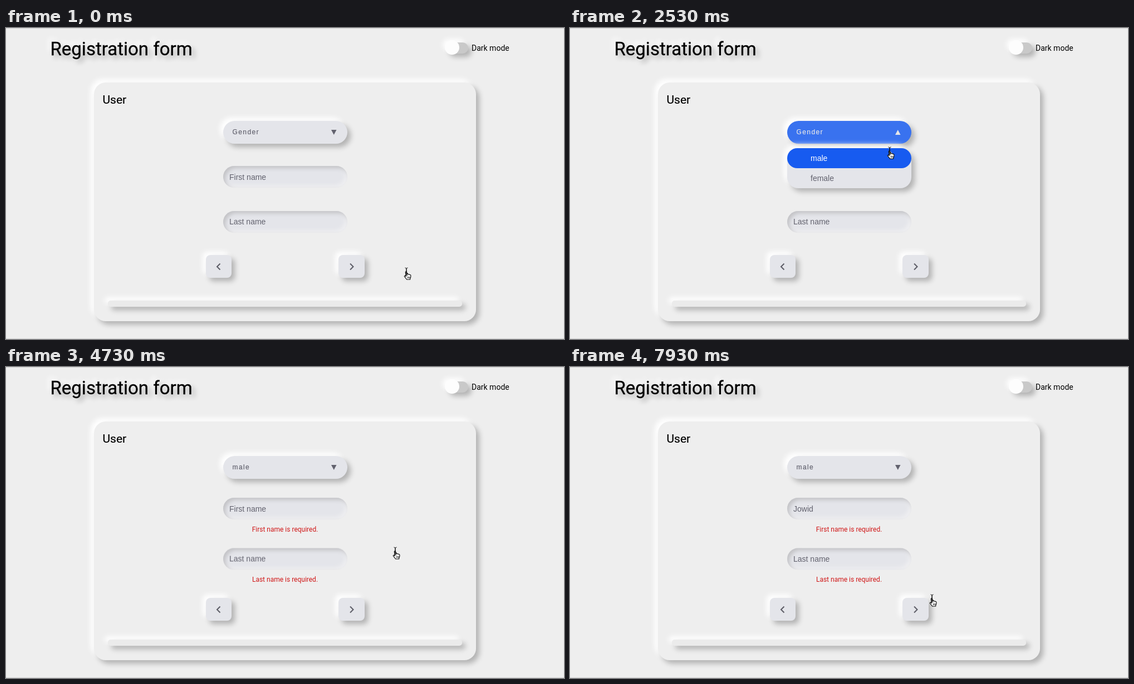
An HTML page that plays this animation: 1002 by 559 pixels, repeating every 8 s.

```html
<!DOCTYPE html>
<html lang="en">
<head>
<meta charset="utf-8">
<title>Registration form</title>
<style>
  :root {
    --bg: #eee;
    --field: #e4e5ea;
    --blue: #175bf0;
    --ink: #62626e;
    --raised: 6px 6px 10px rgba(0, 0, 0, .25), -6px -6px 10px #fff;
  }
  * { box-sizing: border-box; }
  html, body { margin: 0; width: 100%; height: 100%; overflow: hidden; background: var(--bg); }
  .stage {
    position: relative; width: 1002px; height: 559px; overflow: hidden;
    border: solid #d2d2d2; border-width: 1px 0;
    background: var(--bg); color: #000;
    font: 14px/20px Roboto, sans-serif;
  }
  /* offset by the top border so that coordinates are stage coordinates */
  .page { position: absolute; left: 0; top: -1px; width: 1002px; height: 559px; }
  .page > * { position: absolute; margin: 0; white-space: nowrap; }

  h1, h2 { font-weight: 400; }
  h1 {
    left: 79.5px; top: 17.5px; font-size: 33px; line-height: 40px;
    -webkit-text-stroke: .3px;
    text-shadow: 6px 6px 8px rgba(0, 0, 0, .28), -6px -6px 8px #fff;
  }
  h2 { left: 173.5px; top: 117px; font-size: 21px; line-height: 24px; -webkit-text-stroke: .2px; }

  .track { left: 790px; top: 26px; width: 40px; height: 20px; border-radius: 10px; background: #c9c9c9; box-shadow: var(--raised); }
  .knob { left: 788px; top: 22px; width: 26px; height: 26px; border-radius: 50%; background: #fdfdfd; }
  .mode { left: 836px; top: 26px; }

  .card { left: 158px; top: 97.5px; width: 686px; height: 429px; border-radius: 21px; background: var(--bg); box-shadow: var(--raised); }
  .bar { left: 183px; top: 490px; width: 636px; height: 11px; border-radius: 5px; background: #ebebeb; box-shadow: var(--raised); }

  .select, .input, .list { left: 389.5px; width: 223px; font-family: "Liberation Sans", Arial, sans-serif; }
  .select, .input { display: flex; align-items: center; border-radius: 20.5px; background: var(--field); }
  .select {
    top: 166.5px; height: 41px; padding-left: 17px; box-shadow: var(--raised);
    font-size: 12px; letter-spacing: 1.4px; -webkit-text-stroke: .2px;
  }
  .select span { position: absolute; }
  .select i { position: absolute; left: 194px; top: 16px; width: 9.5px; height: 9px; background: currentColor; clip-path: polygon(0 0, 100% 0, 50% 100%); }
  .input {
    height: 39px; padding-left: 11.5px; color: var(--ink);
    box-shadow: inset 4px 4px 7px #c3c3c6, inset -4px -4px 7px #efeff1;
  }
  .caret { width: 1px; height: 16px; margin-right: -1px; background: #333; }

  .list { top: 216px; height: 72px; border-radius: 20px; background: var(--field); box-shadow: var(--raised); z-index: 2; color: var(--ink); }
  .list div { height: 36px; padding-left: 42.5px; line-height: 36px; border-radius: 18px; }
  .list .on { background: var(--blue); color: #fff; }

  .error { left: 0; width: 1002px; text-align: center; font-size: 12px; line-height: 16px; color: #d01818; }

  .btn { top: 408px; width: 46.5px; height: 41px; border-radius: 8px; background: var(--field); color: #5c5c66; box-shadow: var(--raised); }
  .btn svg { position: absolute; left: 16px; top: 13px; fill: none; stroke: currentColor; stroke-width: 2; }

  .popup {
    left: 474.5px; top: 282px; width: 133.5px; padding: 4px 0 2px; z-index: 3;
    border-radius: 3px; background: #242426; color: #f4f4f4;
    font: 11px/31px Inter, sans-serif; box-shadow: 0 1px 3px rgba(0, 0, 0, .3);
  }
  .popup::before { content: ""; position: absolute; left: 9px; top: -7px; border: solid transparent; border-width: 0 8.5px 7px; border-bottom-color: #242426; }
  .popup div { padding-left: 10.5px; }
  [hidden] { display: none !important; }

  .cursor { left: 0; top: 0; z-index: 4; }
  .cursor svg { position: absolute; overflow: visible; stroke-linejoin: round; }

  /* timeline: 1% = 80ms */
  .select, .select *, .input, .list, .error, .btn, .btn svg, .cursor, .cursor svg { animation: 8s linear infinite; }
  .select { animation-name: shift, select; animation-timing-function: step-end, linear; }
  .select i { animation-name: flip; animation-timing-function: step-end; }
  .before { animation-name: before; animation-timing-function: step-end; }
  .after { animation-name: after; animation-timing-function: step-end; }
  .input, .btn { animation-name: shift; animation-timing-function: step-end; }
  .btn.next { animation-name: shift, next; animation-timing-function: step-end, linear; }
  .next svg { animation-name: chevron; animation-timing-function: step-end; }
  .list { animation-name: list; animation-timing-function: step-end; }
  .error { animation-name: error; animation-timing-function: step-end; }
  .cursor { animation-name: path; animation-timing-function: ease-in-out; }
  .cursor svg { animation-timing-function: step-end; }
  .arrow { animation-name: arrow; }
  .hand { animation-name: hand; }
  .beam { animation-name: beam; }

  @keyframes shift { 0% { transform: none; } 47.5%, 100% { transform: translateY(var(--dy)); } }
  @keyframes error { 0% { opacity: 0; } 47.5%, 100% { opacity: 1; } }
  @keyframes select {
    0%, 20.2%, 34.8%, 100% { background: var(--field); color: var(--ink); }
    24%, 31% { background: var(--blue); color: #fff; }
  }
  @keyframes flip { 0%, 34.4%, 100% { transform: none; } 26.3% { transform: scaleY(-1); } }
  @keyframes list { 0%, 34.4%, 100% { opacity: 0; } 26.3% { opacity: 1; } }
  @keyframes before { 0% { opacity: 1; } 34.4%, 100% { opacity: 0; } }
  @keyframes after { 0% { opacity: 0; } 34.4%, 100% { opacity: 1; } }
  @keyframes next { 0%, 43.2%, 53.8%, 100% { background: var(--field); } 47%, 50.2% { background: var(--blue); } }
  @keyframes chevron { 0%, 50.2%, 100% { color: #5c5c66; } 43.2% { color: #fff; } }
  @keyframes path {
    0%, 5% { transform: translate(719px, 438px); }
    6.6%, 11.6% { transform: translate(719px, 416px); }
    21.6%, 29.4% { transform: translate(578px, 195px); }
    31.5%, 34.4% { transform: translate(574px, 221px); }
    43.2% { transform: translate(634px, 409px); }
    46%, 49% { transform: translate(628px, 424px); }
    54%, 66% { transform: translate(699px, 331px); }
    70%, 88.5% { transform: translate(560px, 256px); }
    93% { transform: translate(768px, 345px); }
    97.5% { transform: translate(688px, 416px); }
    99.1%, 100% { transform: translate(650px, 416px); }
  }
  @keyframes arrow {
    0%, 20.5%, 36.9%, 43%, 68.6% { opacity: 0; }
    5%, 34.6%, 38%, 50.2%, 90%, 100% { opacity: 1; }
  }
  @keyframes hand { 0%, 34.6%, 50.2%, 100% { opacity: 0; } 20.5%, 43% { opacity: 1; } }
  @keyframes beam { 0%, 38%, 72%, 90%, 100% { opacity: 0; } 36.9%, 68.6%, 88.5% { opacity: 1; } }
</style>
</head>
<body>
<div class="stage"><div class="page">
  <h1>Registration form</h1>
  <div class="track"></div><div class="knob"></div><div class="mode">Dark mode</div>
  <div class="card"></div>
  <h2>User</h2>
  <div class="bar"></div>

  <div class="select" style="--dy:-7px"><span class="before">Gender</span><span class="after">male</span><i></i></div>
  <div class="input" style="top:248px;--dy:-13px"><span id="typed"></span><span id="caret" class="caret" hidden></span><span id="hint">First name</span></div>
  <div class="input" style="top:328.5px;--dy:-3.5px">Last name</div>
  <div class="error" style="top:284px">First name is required.</div>
  <div class="error" style="top:374px">Last name is required.</div>
  <div class="btn" style="left:358.5px;--dy:7px"><svg width="14" height="15"><path d="M9.5 2.5 4 8l5.5 5.5"/></svg></div>
  <div class="btn next" style="left:597px;--dy:7px"><svg width="14" height="15"><path d="M5 2.5 10.5 8 5 13.5"/></svg></div>

  <div class="list"><div class="on">male</div><div>female</div></div>
  <div id="popup" class="popup" hidden></div>

  <div class="cursor">
    <svg class="arrow" width="10" height="16"><path d="M0 0V11.5L2.7 9.1 4.7 13.7 6.6 12.9 4.7 8.4H8.2Z" stroke="#fff"/></svg>
    <svg class="hand" width="14" height="17"><path d="M-1.7 1C-1.9-.4.3-.6.7.8L1.7 4.6C2.3 3.9 3.5 4.2 3.8 5 4.6 4.4 5.7 4.8 5.9 5.6 7 5.2 7.8 6 7.9 7 8.2 9.7 7.7 10.7 6.7 12.4V14H.5C-.3 12-2.4 10.7-3.6 8.7-4.1 7.4-2.6 6.9-1.7 7.9L-.7 8.7Z" fill="#fff" stroke="#000" stroke-width="1.1"/><path d="M2.4 9v3M4.2 9v3M6 9v3" stroke="#000" stroke-width=".8"/></svg>
    <svg class="beam" width="8" height="16"><path d="M-2.5-7Q0-7 0-5V5Q0 7-2.5 7M2.5-7Q0-7 0-5V5Q0 7 2.5 7" fill="none" stroke="#111"/></svg>
  </div>
</div></div>
<script>
  const LOOP = 8000, FOCUS = 5640, BLUR = 6850;
  const NAME = 'Jowid';
  const KEYS = [5800, 6050, 6250, 6450, 6650];
  const SAVED = ['Jowid', 'Jo', 'J', 'Jowidław', 'Jowi', 'jowid'];
  const [typed, caret, hint, popup] = ['typed', 'caret', 'hint', 'popup'].map(id => document.getElementById(id));

  const rows = SAVED.map(name => {
    const row = document.createElement('div');
    row.textContent = name;
    return popup.appendChild(row);
  });

  let start;
  function draw(now) {
    start ??= now;
    const t = (now - start) % LOOP;
    const text = NAME.slice(0, KEYS.filter(k => k <= t).length);
    const focused = t >= FOCUS && t < BLUR;
    typed.textContent = text;
    hint.hidden = text !== '';
    caret.hidden = !focused;
    popup.hidden = !focused || !text;
    rows.forEach((row, i) => {
      row.hidden = !SAVED[i].toLowerCase().startsWith(text.toLowerCase());
    });
    requestAnimationFrame(draw);
  }
  requestAnimationFrame(draw);
</script>
</body>
</html>
```
